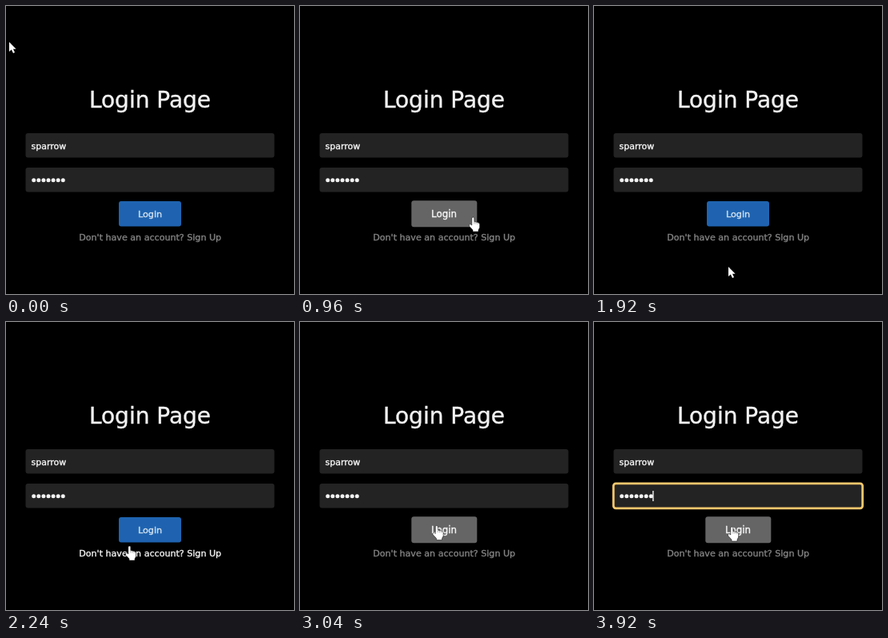
Write an HTML page that moves like this. It is 360 px wide and 360 px high and loops after 4000 ms.

```html
<!DOCTYPE html>
<html lang="en">
<head>
<meta charset="utf-8">
<title>Login Page</title>
<style>
  html, body { margin: 0; width: 100%; height: 100%; overflow: hidden; background: #000; }
  svg { display: block; width: 100vw; height: 100vh; }
  text { font-family: "DejaVu Sans", Verdana, sans-serif; fill: #f2f2f2; stroke: #f2f2f2; stroke-width: .4px; }
  .middle { text-anchor: middle; }
  .field { fill: #232323; }
</style>
</head>
<body>
<svg viewBox="0 0 360 360">
  <rect width="360" height="360"/>
  <text class="middle" x="180" y="127" font-size="28">Login Page</text>

  <rect class="field" x="24.5" y="159" width="311" height="30.5" rx="3"/>
  <text x="31.5" y="178.5" font-size="11">sparrow</text>

  <rect class="field" x="24.5" y="202" width="311" height="30.5" rx="3"/>
  <g id="dots" fill="#f2f2f2"></g>
  <g id="focus">
    <rect x="24.3" y="201.8" width="311.4" height="31" rx="3" fill="none" stroke="#f5c76c" stroke-width="2.8"/>
    <rect x="73.2" y="211" width="1.4" height="13" fill="#f2f2f2"/>
  </g>

  <rect id="button" rx="3"/>
  <text id="label" class="middle" x="180">Login</text>
  <text id="link" class="middle" x="180.2" y="293" font-size="11.1">Don't have an account? Sign Up</text>

  <path id="arrow" fill="#fff" d="M0 0V12L2.8 9.5L5 14L7 13L5 8.8H8.6Z"/>
  <g id="hand">
    <path fill="#fff" stroke="#000" stroke-width=".5" d="M3.8 .8Q5.2 -.8 6.8 .8V5.6L12 6.8Q13.6 7.4 13.6 9.2V13L12 16V18H5V16L.6 11.2Q-.2 9.2 1.8 8.6L3.8 10Z"/>
    <path fill="none" stroke="#666" stroke-width=".5" d="M6.8 6V8.6M9 6.6V8.8M11.2 7V9.2"/>
  </g>
</svg>
<script>
const LOOP = 4000, FOCUS_AT = 3920;
const $ = id => document.getElementById(id);

// Pointer steps: start time, left, top, hovered item ("hand" hovers nothing).
const steps = [
  [0, 4, 45], [160, 8, 70], [240, 22, 150], [320, 45, 260], [400, 70, 345],
  [560, 164, 357], [640, 200, 346], [720, 224, 318], [800, 231, 287, "hand"],
  [960, 211, 264, "button"], [1040, 199, 259, "button"], [1120, 187, 257, "button"],
  [1200, 179, 260, "button"], [1360, 175, 270, "button"], [1440, 173, 290, "link"],
  [1520, 172, 309, "link"], [1600, 172, 309, "hand"], [1920, 168, 326], [2000, 162, 341],
  [2160, 154, 308, "link"], [2240, 149, 280, "link"], [2320, 147, 262, "button"],
  [2400, 146, 247, "button"], [2560, 147, 246, "button"], [2720, 148, 247, "button"],
  [2960, 158, 251, "button"], [3040, 165.5, 254.5, "button"], [3120, 166, 255, "button"],
  [3360, 167, 256, "button"]
];

for (let i = 0; i < 7; i++) {
  $("dots").innerHTML += `<circle cx="${34.7 + i * 6.1}" cy="217.8" r="2.5"/>`;
}

function set(id, attrs) {
  for (const name in attrs) $(id).setAttribute(name, attrs[name]);
}

function show(id, visible) {
  set(id, { visibility: visible ? "visible" : "hidden" });
}

function paintText(id, color) {
  $(id).style.fill = $(id).style.stroke = color;
}

function draw(time) {
  const [, x, y, hover] = steps.findLast(step => step[0] <= time);
  const onButton = hover === "button";

  set("button", onButton
    ? { x: 139.3, y: 243.3, width: 82, height: 33, fill: "#656565" }
    : { x: 141, y: 244, width: 78, height: 31.5, fill: "#1f63b0" });
  set("label", onButton
    ? { y: 264, "font-size": 11.8 }
    : { y: 263.7, "font-size": 11.2 });
  paintText("label", onButton ? "#f5f5f5" : "#cfdff0");
  paintText("link", hover === "link" ? "#f0f0f0" : "#808080");

  show("focus", time >= FOCUS_AT);
  show("arrow", !hover);
  show("hand", hover);
  set(hover ? "hand" : "arrow", { transform: `translate(${x} ${y})` });
}

const start = performance.now();
function tick() {
  draw((performance.now() - start) % LOOP);
  requestAnimationFrame(tick);
}
tick();
</script>
</body>
</html>
```
